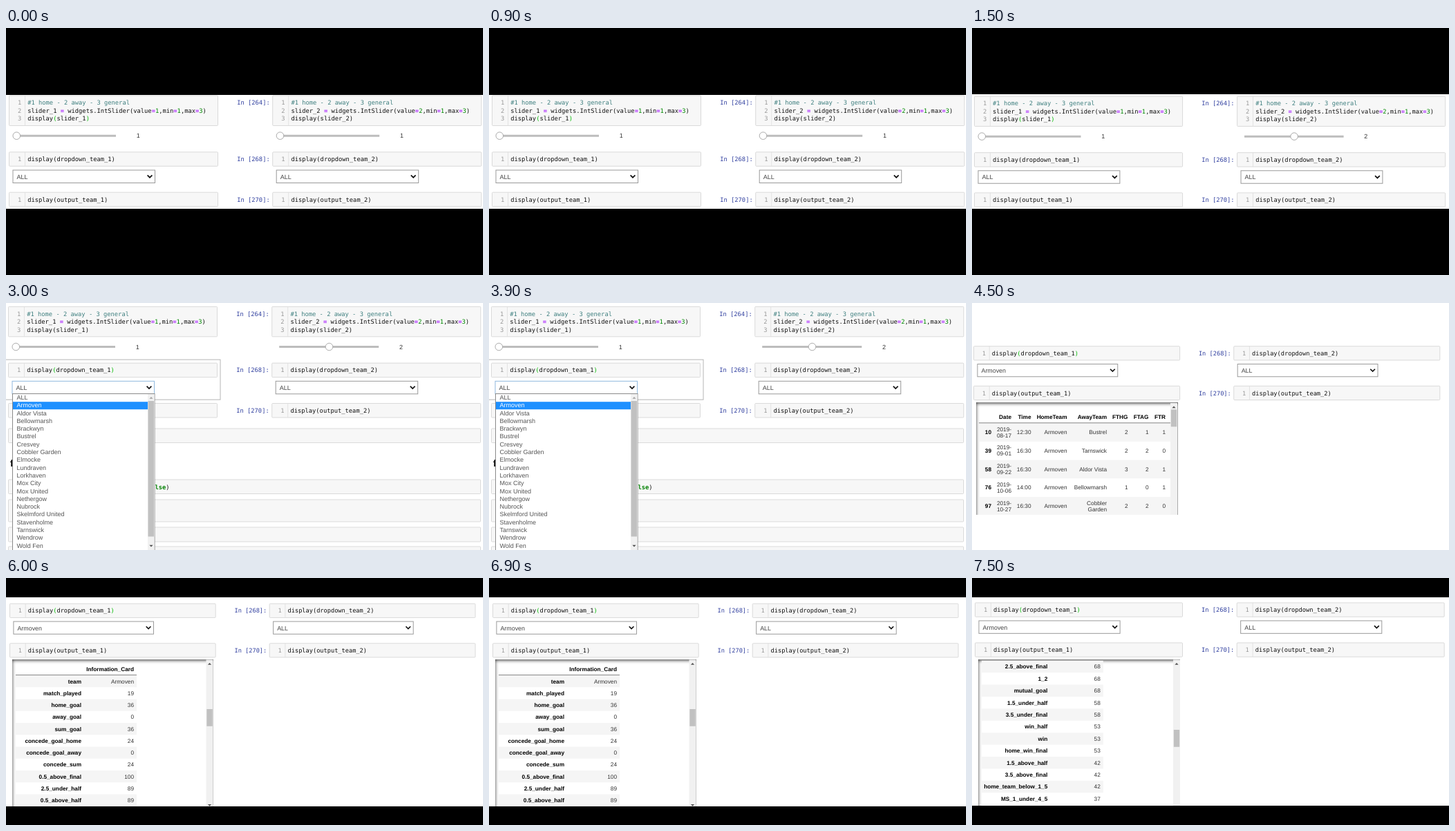
An HTML page that plays this animation: 690 by 358 pixels, repeating every 8000 ms.

```html
<!DOCTYPE html>
<html lang="en">
<head>
<meta charset="utf-8">
<title>Notebook team browser</title>
<style>
  html, body { margin: 0; width: 100%; height: 100%; overflow: hidden; background: #fff; }
  svg { display: block; text-rendering: geometricPrecision; }
  .code { font: 8.78px "DejaVu Sans Mono", monospace; fill: #111; }
  .sans { font-family: "Liberation Sans", Arial, sans-serif; fill: #333; }
  .bold { font-weight: bold; fill: #000; }
  .inset { height: 300px; box-shadow: inset 0 1.3px 5px rgba(0, 0, 0, .8); }
</style>
</head>
<body>
<svg id="stage" width="690" height="358" viewBox="0 0 690 358"></svg>
<script>
const COLUMN = 381.2;   // distance between the left and right notebook columns
const HOLD = 1500, LOOP = 8000;
const CLUB = 'Armoven';
const CLUBS = ['ALL', CLUB, 'Aldor Vista', 'Bellowmarsh', 'Brackwyn', 'Bustrel', 'Cresvey',
  'Cobbler Garden', 'Elmocke', 'Lundraven', 'Lorkhaven', 'Mox City', 'Mox United', 'Nethergow',
  'Nubrock', 'Skelmford United', 'Stavenholme', 'Tarnswick', 'Wendrow', 'Wold Fen'];

const rect = (x, y, w, h, fill, stroke = 'none') =>
  `<rect x="${x}" y="${y}" width="${w}" height="${h}" fill="${fill}" stroke="${stroke}"/>`;
const path = (d, stroke, width = 1) =>
  `<path d="${d}" fill="none" stroke="${stroke}" stroke-width="${width}"/>`;
const span = (s, fill, weight = 'normal') => `<tspan fill="${fill}" font-weight="${weight}">${s}</tspan>`;

// Text is placed by the vertical centre of its capitals.
const code = (x, y, s, attrs = '') => `<text class="code" x="${x}" y="${y + 3.1}" ${attrs}>${s}</text>`;
const sans = (x, y, s, { size = 8.25, anchor = 'start', bold = false, fill = '' } = {}) =>
  `<text class="sans${bold ? ' bold' : ''}" x="${x}" y="${y + size * .36}" font-size="${size}"
    text-anchor="${anchor}" ${fill && `style="fill:${fill}"`}>${s}</text>`;
const right = (x, y, s, bold = false) => sans(x, y, s, { anchor: 'end', bold });

const box = (x, y, w, h) =>
  `<rect x="${x}" y="${y}" width="${w}" height="${h}" rx="1" fill="#f7f7f7" stroke="#d2d2d2" stroke-width=".8"/>`;

function highlight(line, matched) {
  if (line[0] === '#') return span(line, '#408080');
  if (matched) return line.replace(/[()]/g, b => span(b, '#0b0'));
  return line.replace(/=(\d?)/g, (_, n) => span('=', '#a2f', 'bold') + (n && span(n, '#080')));
}

function cell(dx, y, lines, { prompt, matched } = {}) {
  const h = lines.length * 11.5 + 9;
  let out = box(dx + 4.5, y, 302, h) + path(`M${dx + 27.5} ${y}v${h}`, '#ddd', .8);
  lines.forEach((line, i) => {
    const mid = y + 10.3 + i * 11.5;
    out += code(dx + 17, mid, i + 1, 'style="fill:#999"');
    out += code(dx + 31.2, mid, highlight(line, matched && i === lines.length - 1),
      line[0] === '#' ? 'font-style="italic"' : '');
  });
  if (prompt) out += code(334.2, y + 10.3, `In [${prompt}]:`, 'style="fill:#303f9f"');
  return out;
}

const slider = (dx, value, shown = value) => path(`M${dx + 15} 156.2h144`, '#bdbdbd', 3)
  + `<circle cx="${dx + 15.3 + (value - 1) * 72}" cy="156.2" r="5.3" fill="#fff" stroke="#aaa"/>`
  + sans(dx + 188.8, 156.2, shown, { size: 9 });

const select = (dx, label, border = '#999') => rect(dx + 10, 206, 205.5, 18.5, '#fff', border)
  + sans(dx + 15.6, 215.5, label, { size: 9, fill: '#444' })
  + path(`M${dx + 204.6} 213.3l3.4 3.4l3.4-3.4`, '#111', 1.7);

function notebook({ scale, x, y, second = 2, choice = 'ALL', matched = 'dropdown', focus }) {
  let out = focus ? rect(-4, 174.8, 315, 58, '#fff', '#b5b5b5') : '';
  for (const n of [1, 2]) {
    const dx = (n - 1) * COLUMN, first = n === 1;
    const prompt = id => first ? 0 : id;
    out += cell(dx, 98, ['#1 home - 2 away - 3 general',
        `slider_${n} = widgets.IntSlider(value=${n},min=1,max=3)`, `display(slider_${n})`],
        { prompt: prompt(264), matched: first && matched === 'slider' })
      + slider(dx, first ? 1 : second)
      + cell(dx, 179.8, [`display(dropdown_team_${n})`],
        { prompt: prompt(268), matched: first && matched === 'dropdown' })
      + select(dx, first ? choice : 'ALL', first && focus ? '#8fb8de' : '#999')
      + cell(dx, 238.2, [`display(output_team_${n})`], { prompt: prompt(270) });
  }
  return `<g transform="translate(${x} ${y}) scale(${scale})">${out}</g>`;
}

const arrow = (x, y, dir, fill) => `<path d="M${x - 2.6} ${y + dir * 1.3}h5.2l-2.6 ${-dir * 2.8}z" fill="${fill}"/>`;

function openList() {
  const below = [[182, 20.5], [256, 20.5], [285, 32], [325, 21], [353, 21]];
  let out = below.map(([y, h]) => box(3.5, y, 683, h)).join('')
    + sans(6, 232, 'f', { size: 14, bold: true })
    + code(215.5, 266.5, span('lse', '#008000', 'bold') + ')')
    + rect(9.5, 131.5, 205.5, 240, '#fff', '#8a8a8a')
    + rect(10, 143.2, 195, 11, '#1e90ff');
  CLUBS.forEach((club, i) => {
    out += sans(15.5, 136.8 + i * 11.29, club, { size: 9, fill: i === 1 ? '#fff' : '#555' });
  });
  return out + rect(205, 132, 9.5, 226, '#f1f1f1') + rect(205.5, 142, 8.5, 196.5, '#c1c1c1')
    + arrow(210, 137.5, 1, '#a3a3a3') + arrow(210, 352, -1, '#505050');
}

const shadow = (x, y, w, h) => `<foreignObject x="${x}" y="${y}" width="${w}" height="${h}">
  <div xmlns="http://www.w3.org/1999/xhtml" class="inset"></div></foreignObject>`;

const scrollbar = (x, top, bottom, thumb) => rect(x, top, 10, bottom - top, '#f1f1f1')
  + rect(x + .8, thumb, 8.4, 24.8, '#c1c1c1') + arrow(x + 5, top + 6, 1, '#505050');

function matches() {
  const edges = [28, 57, 85.5, 137.5, 195, 225.5, 255.5, 280];
  const heads = ['', 'Date', 'Time', 'HomeTeam', 'AwayTeam', 'FTHG', 'FTAG', 'FTR'];
  const rows = [
    [10, '2019-|08-17', '12:30', CLUB, 'Bustrel', 2, 1, 1],
    [39, '2019-|09-01', '16:30', CLUB, 'Tarnswick', 2, 2, 0],
    [58, '2019-|09-22', '16:30', CLUB, 'Aldor Vista', 3, 2, 1],
    [76, '2019-|10-06', '14:00', CLUB, 'Bellowmarsh', 1, 0, 1],
    [97, '2019-|10-27', '16:30', CLUB, 'Cobbler|Garden', 2, 2, 0]];
  let out = shadow(6, 144, 292, 163);
  heads.forEach((head, i) => out += right(edges[i], 165, head, true));
  rows.forEach((row, r) => {
    const top = 174 + r * 26.75;
    if (r % 2 === 0) out += rect(10, top, 277, 26.75, '#f5f5f5');
    row.forEach((value, i) => {
      const parts = String(value).split('|');
      parts.forEach((part, k) => {
        out += right(edges[i], top + 13.2 + (k - (parts.length - 1) / 2) * 9, part, i === 0);
      });
    });
  });
  return out + path('M10 173.8H287', '#777', .9) + scrollbar(287, 145, 307, 154.5);
}

function stats({ rows, first, step, labelX, valueX, bottom, barX, thumb, head }) {
  let out = shadow(9, 118, barX - 9 + 10, bottom - 118);
  rows.split(' ').forEach((row, i) => {
    const [label, value] = row.split(':'), mid = first + i * step;
    if (i % 2 === 0) out += rect(14, mid - step / 2, valueX - 10, step, '#f5f5f5');
    out += right(labelX, mid, label, true) + right(valueX, mid, value);
  });
  if (head) out += right(valueX, 132, head, true) + path('M14 140.6H189', '#777', .9);
  return out + scrollbar(barX, 118.5, bottom, thumb);
}

const card = {
  rows: `team:${CLUB} match_played:19 home_goal:36 away_goal:0 sum_goal:36 concede_goal_home:24 `
    + 'concede_goal_away:0 concede_sum:24 0.5_above_final:100 2.5_under_half:89 0.5_above_half:89',
  first: 149.7, step: 17.24, labelX: 109, valueX: 185, bottom: 331, barX: 289.5, thumb: 190,
  head: 'Information_Card'
};
const cardScrolled = {
  rows: '2.5_above_final:68 1_2:68 mutual_goal:68 1.5_under_half:58 3.5_under_final:58 win_half:53 '
    + 'win:53 home_win_final:53 1.5_above_half:42 3.5_above_final:42 home_team_below_1_5:42 MS_1_under_4_5:37',
  first: 128.5, step: 17.4, labelX: 109.3, valueX: 185.8, bottom: 330, barX: 291, thumb: 220
};

// Each scene shows its content between top and bottom on a backdrop.
const scenes = [
  { backdrop: '#000', top: 97, bottom: 262,
    body: notebook({ scale: 1, x: 0, y: 0, second: 1, matched: 'slider' }) },
  { backdrop: '#000', top: 96, bottom: 262,
    body: notebook({ scale: .997, x: -1, y: 1.4, matched: 'slider' }) },
  { backdrop: '#fff', top: 0, bottom: 358,
    body: notebook({ scale: 1, x: -1, y: -92.7, focus: true }) + openList() },
  { backdrop: '#fff', top: 52, bottom: 307,
    body: notebook({ scale: .987, x: -1.94, y: -114.8, choice: CLUB }) + matches() },
  { backdrop: '#000', top: 28, bottom: 331,
    body: notebook({ scale: .9856, x: 1.07, y: -140, choice: CLUB }) + stats(card)
      + arrow(294.5, 329.3, -1, '#505050') },
  { backdrop: '#000', top: 28, bottom: 330,
    body: notebook({ scale: .9934, x: .03, y: -142.7, choice: CLUB }) + stats(cardScrolled) }
];

const stage = document.getElementById('stage');
stage.innerHTML = scenes.map(({ backdrop, top, bottom, body }) => {
  const h = bottom - top;
  return `<g>${rect(0, 0, 690, 358, backdrop)}<svg y="${top}" width="690" height="${h}"
    viewBox="0 ${top} 690 ${h}">${rect(0, top, 690, h, '#fff')}${body}</svg></g>`;
}).join('');
const groups = [...stage.children];

function draw() {
  const current = Math.floor(performance.now() % LOOP / HOLD);
  groups.forEach((group, i) => group.style.display = i === current ? '' : 'none');
  requestAnimationFrame(draw);
}
draw();
</script>
</body>
</html>
```
